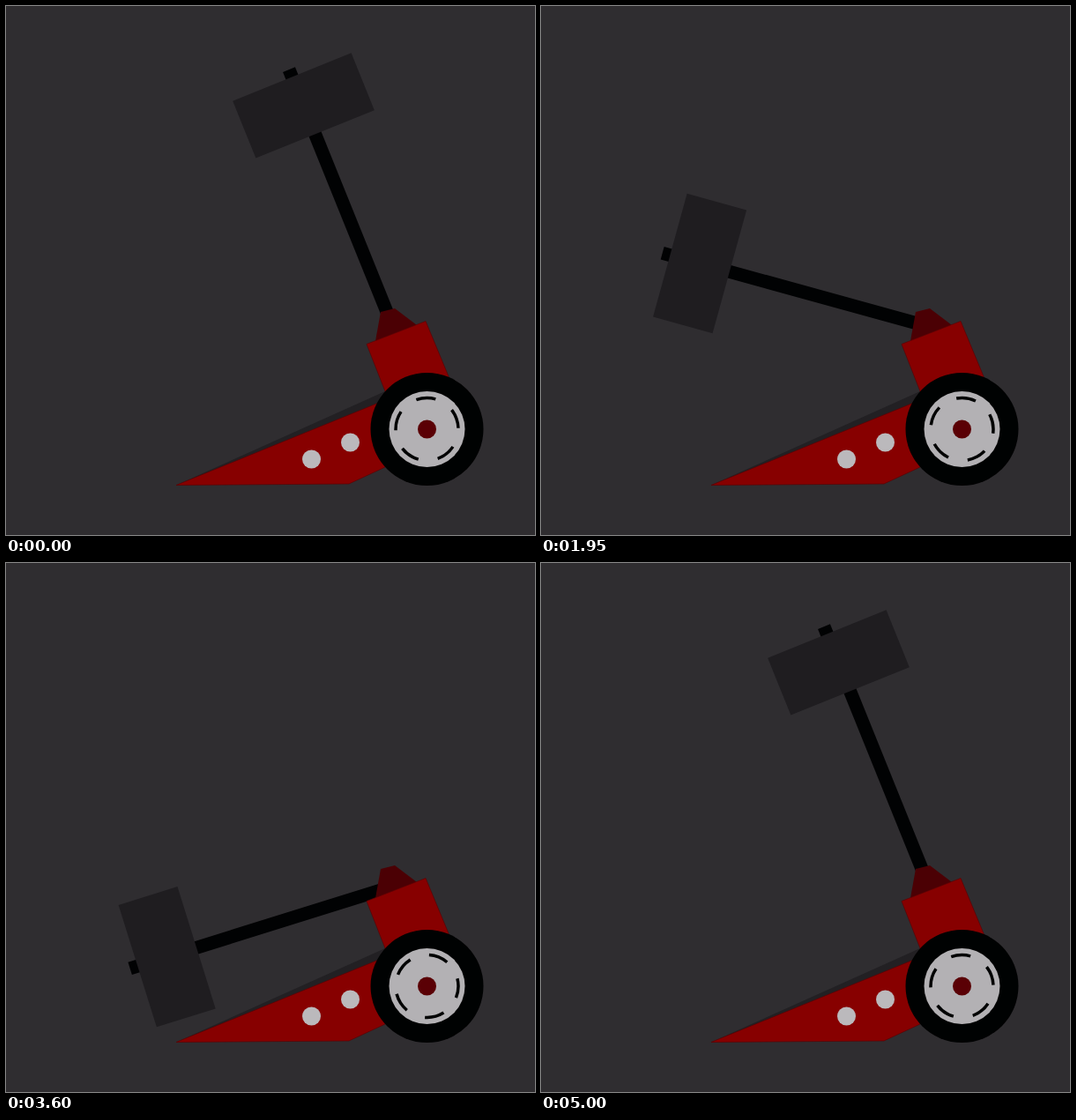
Recreate the animation shown at these times as an HTML page. Size 600 by 600 pixels, loop 5050 ms.

```html
<!DOCTYPE html>
<html lang="en">
<head>
<meta charset="utf-8">
<title>Hammer robot</title>
<style>
  html, body { margin: 0; width: 100%; height: 100%; overflow: hidden; background: #2f2d30; }
  svg { display: block; width: 100%; height: 100%; }
</style>
</head>
<body>
<svg viewBox="0 0 600 600">
  <g id="hammer">
    <rect x="-311" y="-7.5" width="311" height="15" fill="#010203"/>
    <rect x="-302" y="-72.5" width="70" height="145" fill="#1f1d20"/>
  </g>
  <path d="M425 347L441 343L466 362L419 380Z" fill="#4b0004"/>
  <path d="M194 543L430 437V450Z" fill="#222023"/>
  <g fill="#870000" stroke="#5c0204" stroke-width=".7">
    <path d="M409 383.500L476 357.500L504 425L432 442Z"/>
    <path d="M193 543.500L430 447V523L389 542Z"/>
  </g>
  <g fill="#bbb9bc">
    <circle cx="346.500" cy="514" r="10.500"/>
    <circle cx="390.500" cy="495" r="10.500"/>
  </g>
  <g transform="translate(477.500 480)">
    <circle r="64" fill="#000202"/>
    <circle r="43" fill="#b3b1b4"/>
    <circle id="spokes" r="35.500" fill="none" stroke="#000202" stroke-width="3.500"
            pathLength="10" stroke-dasharray="1 1"/>
    <circle r="10.500" fill="#5a0005"/>
  </g>
  <path id="sparks" d="M-57-31.500L-26-22M-72 22L-29 1M-20 36.500L-7.500 24"
        stroke="#fff" stroke-width="5.500"/>
</svg>
<script>
const LOOP = 5050, START = 1000, STRIKE = 2120;
const PIVOT = { x: 437.5, y: 360.5 };
const [hammer, spokes, sparks] = ['hammer', 'spokes', 'sparks'].map(id => document.getElementById(id));

// CSS-style cubic Bézier easing, solved by bisection.
function bezier(x1, y1, x2, y2) {
  const at = (a, b, u) => 3 * a * u * (1 - u) ** 2 + 3 * b * u * u * (1 - u) + u ** 3;
  return x => {
    let low = 0, high = 1;
    for (let i = 0; i < 24; i++) {
      const mid = (low + high) / 2;
      if (at(x1, x2, mid) < x) low = mid; else high = mid;
    }
    return at(y1, y2, low);
  };
}
const ease = bezier(.25, .1, .25, 1);
const easeIn = bezier(.42, 0, 1, 1);
const easeInOut = bezier(.42, 0, .58, 1);

// Keys are [time, value, easing towards this value].
function track(keys, t) {
  if (t <= keys[0][0]) return keys[0][1];
  for (let i = 1; i < keys.length; i++) {
    const [t0, v0] = keys[i - 1], [t1, v1, easing = ease] = keys[i];
    if (t < t1) return v0 + (v1 - v0) * easing((t - t0) / (t1 - t0));
  }
  return keys[keys.length - 1][1];
}

// Fall, hit, rebound, dip and slow return; angles are above the horizontal.
const SWING = [[200, 68], [490, -22, easeIn], [609, -22], [856, 31], [1002, 14], [1619, 68]];
const BURST = [[510, 0], [580, 1.11], [630, 1.11], [720, 0, easeInOut]];

function draw(time) {
  const t = Math.max(0, time - START);
  const local = t % STRIKE;
  const angle = track(SWING, local);
  const sag = 5.5 * ((68 - angle) / 78) ** 2;
  hammer.setAttribute('transform', `translate(${PIVOT.x} ${PIVOT.y + sag}) rotate(${angle})`);

  const turn = 720 * easeInOut(t / (LOOP - START));
  spokes.setAttribute('transform', `rotate(${turn - 110})`);

  const size = track(BURST, local);
  sparks.setAttribute('transform', `translate(193 543) scale(${size})`);
  sparks.setAttribute('visibility', size > .01 ? 'visible' : 'hidden');
}

const begin = performance.now();
function tick() {
  draw((performance.now() - begin) % LOOP);
  requestAnimationFrame(tick);
}
tick();
</script>
</body>
</html>
```
